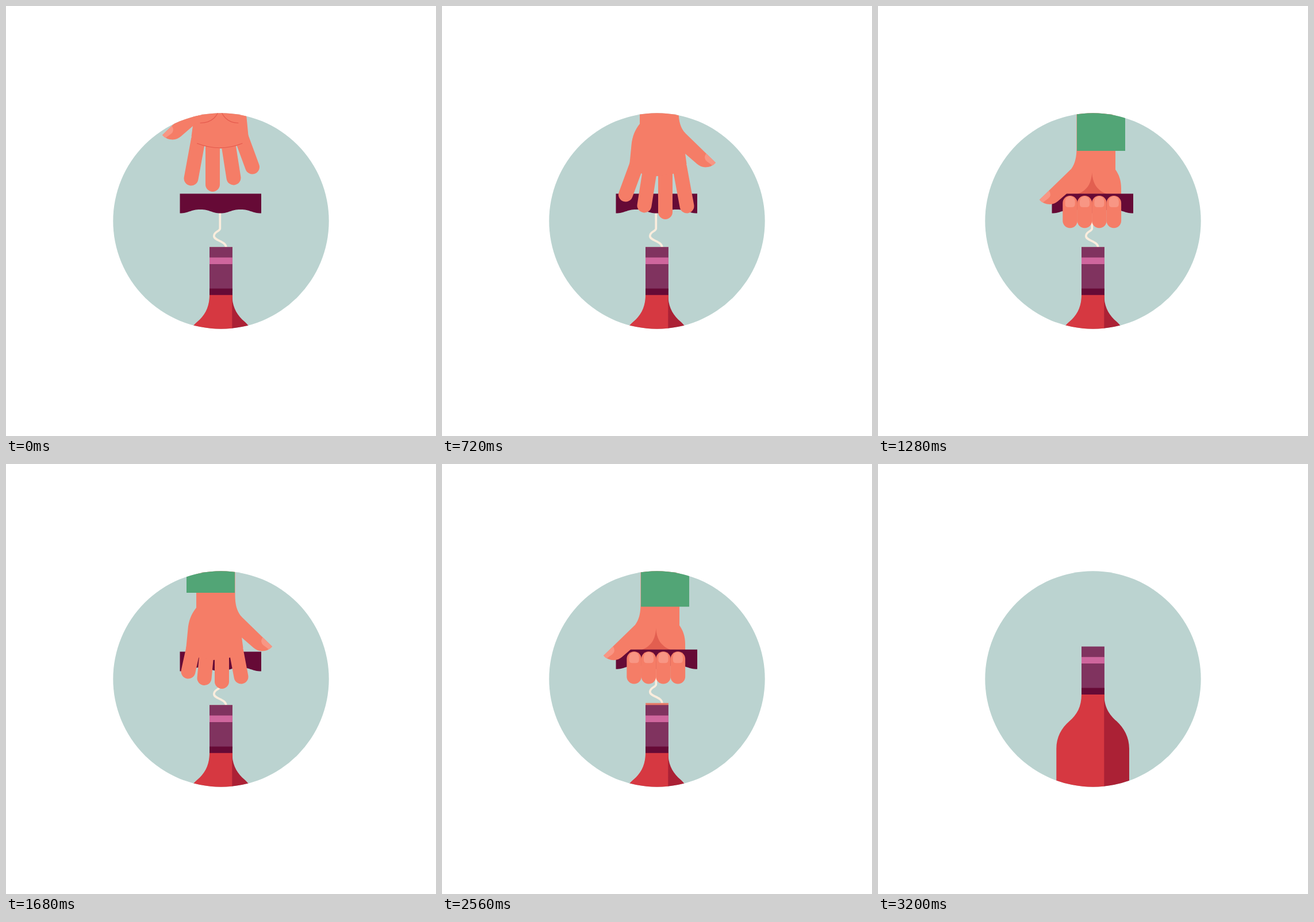
Write an HTML page that moves like this. It is 748 by 748 pixels and loops after 3.8 s.

```html
<!DOCTYPE html>
<html lang="en">
<head>
<meta charset="utf-8">
<title>Corkscrew</title>
<style>
  html, body { margin: 0; width: 100%; height: 100%; overflow: hidden; background: #fff; }
  svg { display: block; width: 100vw; height: 100vh; }
  .skin { fill: #f57d67; }
  .finger { fill: none; stroke: #f57d67; stroke-width: 25; stroke-linecap: round; }
  .crease { fill: none; stroke: #e4594c; stroke-width: 1.1; stroke-linecap: round; }
  .shade { fill: #e25f50; }
  .nail { fill: #f89684; }
  .sleeve { fill: #52a576; }
  .plum { fill: #660a36; }
  .wine { fill: #ab2135; }
</style>
</head>
<body>
<svg viewBox="0 0 748 748">
  <defs>
    <clipPath id="disc"><circle cx="374" cy="374" r="187.7"/></clipPath>

    <g id="thumb">
      <path class="skin" d="M326 290 L272 342.5 Q279 350.5 290 350.5 Q298 350 304 345 L326 326 L345 310Z"/>
      <path class="nail" d="M272 342.5 L288.5 326.500 Q294 335 287 340.500 L277.500 347.500 Q274 345.500 272 342.5Z"/>
    </g>

    <g id="palm">
      <path class="skin" d="M336.500 180 V252 C336.500 268 334 281 325 291 V326 L322.500 345 L346 362 L374 366 L401 361.500 L422 348 L418.500 312 C417 296 412 285 404 275 V180Z"/>
      <path class="sleeve" d="M337 -200 H421 V249 H337Z"/>
    </g>

    <path id="fistPalm" class="skin" d="M345.500 180 V247 C345.500 262 343 276 334 286 L320 318 L327 340 H423 V317 C423 303 419 293 413 284.500 V180Z"/>
    <path id="cuff" class="sleeve" d="M346 -200 H430 V252 H346Z"/>

    <g id="knuckles" class="skin">
      <rect x="321.300" y="330" width="25.600" height="56.300" rx="12.700"/>
      <rect x="346.700" y="330" width="25.600" height="56.300" rx="12.700"/>
      <rect x="372.100" y="330" width="25.600" height="56.300" rx="12.700"/>
      <rect x="397.500" y="330" width="25.600" height="56.300" rx="12.700"/>
    </g>
    <path id="nail" class="nail" d="M325.500 339.500 A8.600 8.600 0 0 1 342.700 339.500 V344.500 Q342.700 350 337 350 H331 Q325.500 350 325.500 344.500Z"/>
  </defs>

  <g clip-path="url(#disc)">
    <rect x="180" y="180" width="388" height="388" fill="#bbd3d0"/>

    <g id="openPalm">
      <path class="finger spread"/>
      <use href="#palm"/>
      <path class="crease" d="M372 289 C371 309 358 321.500 338 321.500 M372 289 C373 309 386 321.500 404 321.500 M332.500 357 Q372 372.500 411 357"/>
    </g>

    <g id="rig">
      <path fill="none" stroke="#fbeddd" stroke-width="3.700" d="M372.300 356 V387 C372.300 392 361.800 392.500 361.800 400 C361.800 409 383 408 383 421"/>
      <g>
        <path fill="#e67b69" d="M354 419.500 H394 L388.300 483 H359.700Z"/>
        <g fill="#cf685b">
          <path d="M357 440.500 A10.800 10.800 0 0 1 359 461.500Z"/>
          <circle cx="383.700" cy="436.300" r="4.200"/>
          <path d="M389.500 464.500 A5.600 5.600 0 0 0 388.600 475.500Z"/>
        </g>
      </g>
      <g id="grip">
        <g id="gripPalm">
          <use href="#fistPalm"/>
          <path class="shade" d="M372.300 289 C371.500 308 364 321 347 327 H398 C381 321 373 308 372.300 289Z"/>
          <use href="#cuff"/>
        </g>
        <g id="gripThumbFar" transform="matrix(-1 0 0 1 748 0)">
          <use href="#thumb" x="9" y="-5.500"/>
        </g>
        <path class="plum" d="M302.500 326.500 H444 V360.500 C428 360.500 425 354 408 354 C391 354 388 360.500 373 360.500 C358 360.500 355 354 338 354 C321 354 318 360.500 302.500 360.500Z"/>
        <g id="gripFingers">
          <use href="#thumb" x="9" y="-5.500"/>
          <g id="curl">
            <use href="#knuckles"/>
            <use href="#nail"/>
            <use href="#nail" x="25.400"/>
            <use href="#nail" x="50.800"/>
            <use href="#nail" x="76.200"/>
          </g>
        </g>
        <g id="gripBack" transform="matrix(-1 0 0 1 748 0)">
          <use href="#fistPalm"/>
          <path class="skin" d="M321.300 318 H423 V372 H321.300Z"/>
          <use href="#knuckles"/>
          <use href="#cuff"/>
        </g>
      </g>
    </g>

    <g id="openThumb"><use href="#thumb"/></g>

    <g id="bottle">
      <path fill="#d63841" d="M354 502 C354 524 346 538 333 549 C319 561 310.300 577 310.300 597 V720 H394 V502Z"/>
      <path class="wine" d="M393.300 502 C393.300 524 402 538 415 549 C428 561 437 577 437 597 V720 H393.300Z"/>
      <path fill="#80335f" d="M354 419.300 H393.900 V495 H354Z"/>
      <path fill="#cf669d" d="M354 437.600 H393.900 V448.900 H354Z"/>
      <path class="plum" d="M354 491.400 H393.900 V502.800 H354Z"/>
    </g>

    <g id="openBack">
      <g transform="matrix(-1 0 0 1 748 0)">
        <path class="finger spread"/>
        <use href="#palm"/>
        <use href="#thumb"/>
      </g>
    </g>

    <g id="side">
      <path class="skin" d="M324 235 H378 V268.500 L425.500 343 Q414 349 403 345.500 V374 Q403 386.300 391 386.300 Q388 386.300 385 385.500 L333 373.600 Q324 371 324 362Z"/>
      <path class="shade" d="M360 332 Q372 320 384 327.500 C390 333 393 343 403 345.500 V349 H386Z"/>
      <path class="nail" d="M412 322 L425.500 343 Q421 346 416.500 346.500 Q416 341 411 336 Q406.500 327 412 322Z"/>
      <circle class="wine" cx="371.800" cy="344.500" r="17"/>
      <path class="sleeve" d="M319 100 H403 V242.500 H319Z"/>
    </g>
  </g>
</svg>
<script>
  const TICK = 40, TICKS = 95, CYCLE = 25, LAST_GRIP = 57;
  const $ = id => document.getElementById(id);
  const spreads = document.querySelectorAll('.spread');

  // Each finger: knuckle x, y, then tip x, y half open and fully open.
  const fingers = [
    [334.500, 350, 326, 395, 322, 418],
    [359.500, 350, 359.500, 403.500, 359.500, 428.500],
    [385.500, 350, 390, 397.500, 396, 417],
    [409, 345, 418, 386, 428.500, 398]
  ];
  const arrive = [-205, -118, -60, -24, -6, 0, 0];
  const depart = [[-13, -25], [0, -70], [0, -145], [0, -230]];

  const ease = p => (1 - Math.cos(Math.PI * Math.min(1, Math.max(0, p)))) / 2;
  const show = (id, on) => { $(id).style.display = on ? '' : 'none'; };
  const move = (id, x, y) => $(id).setAttribute('transform', `translate(${x} ${y})`);

  function spreadFingers(full) {
    const d = fingers.map(f => `M${f[0]} ${f[1]}L${full ? f[4] : f[2]} ${full ? f[5] : f[3]}`).join('');
    spreads.forEach(p => p.setAttribute('d', d));
  }

  function draw(n) {
    const c = n < LAST_GRIP ? n % CYCLE : 7;
    const a = (c + 1) % CYCLE;
    const palm = a < arrive.length;
    const back = c >= 17 && c <= 20;
    const gripPalm = c >= 6 && c <= 10;
    const gripBack = c >= 12 && c <= 16;

    show('openPalm', palm);
    show('openThumb', palm);
    show('openBack', back);
    show('side', c === 11);
    show('grip', c !== 11);
    show('gripPalm', gripPalm);
    show('gripFingers', gripPalm);
    show('gripThumbFar', gripBack);
    show('gripBack', gripBack);

    spreadFingers(c !== 5 && c !== 17);
    if (palm) {
      move('openPalm', 0, arrive[a]);
      move('openThumb', 0, arrive[a]);
    }
    if (back) move('openBack', ...depart[c - 17]);

    // Half-closed fingers, then the wrist turn.
    const curl = c === 6 ? .75 : 1;
    $('curl').setAttribute('transform', `matrix(1 0 0 ${curl} 0 ${386 * (1 - curl)})`);
    const turn = c === 10 || c === 12 ? .7 : 1;
    $('grip').setAttribute('transform', `matrix(${turn} 0 0 1 ${373 * (1 - turn)} 0)`);

    const pull = ease((n - 63) / 7), exit = ease((n - 74) / 6);
    move('rig', pull, -77.300 * pull - 240 * exit);
    show('rig', n < 80);
    move('bottle', 0, -101.800 * exit);
  }

  const start = performance.now();
  let last = -1;
  function loop() {
    const n = Math.floor((performance.now() - start) / TICK) % TICKS;
    if (n !== last) draw(last = n);
    requestAnimationFrame(loop);
  }
  loop();
</script>
</body>
</html>
```
